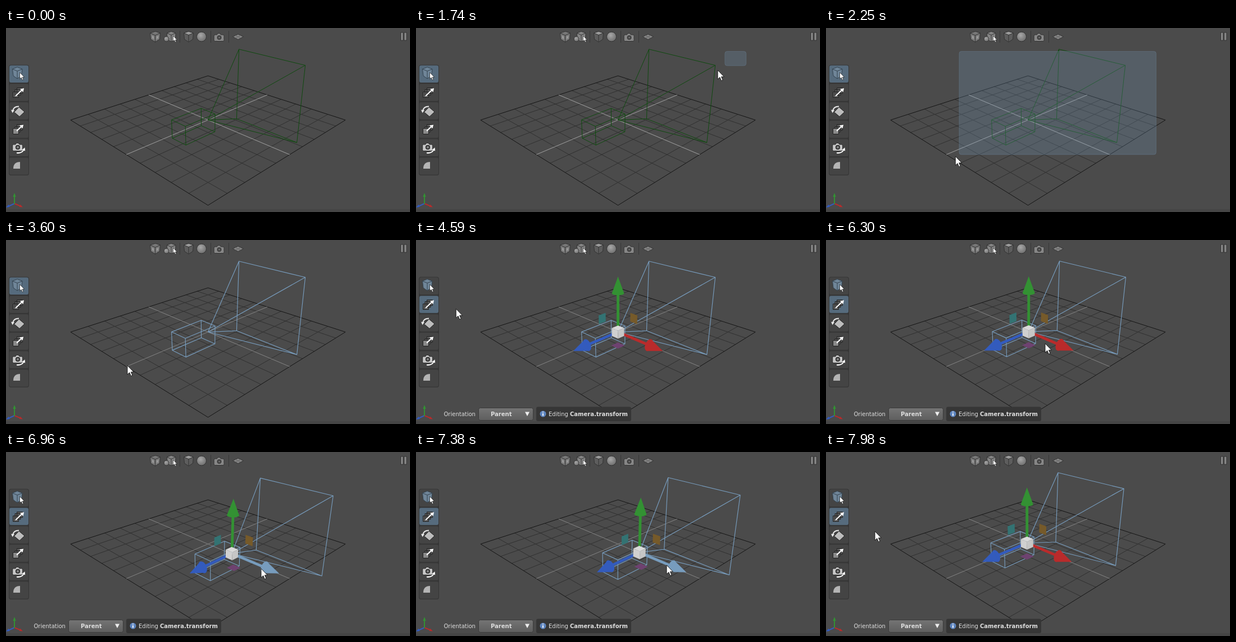
An HTML page for the animation above (8 s loop, 719 by 327 pixels).

```html
<!DOCTYPE html>
<html lang="en">
<head>
<meta charset="utf-8">
<title>Camera gizmo</title>
<style>
html, body { margin: 0; width: 100%; height: 100%; overflow: hidden; background: #4b4b4b; }
svg { display: block; }
text { font: 10px "DejaVu Sans", sans-serif; fill: #dedede; white-space: pre; }
.bold { font-weight: bold; }
</style>
</head>
<body>
<svg id="stage" width="719" height="327" viewBox="0 0 719 327">
  <defs>
    <radialGradient id="ball" cx=".4" cy=".35" r=".7">
      <stop offset="0" stop-color="#a8a8a8"/><stop offset="1" stop-color="#6c6c6c"/>
    </radialGradient>
    <linearGradient id="menu" x2="0" y2="1">
      <stop offset="0" stop-color="#747474"/><stop offset="1" stop-color="#5e5e5e"/>
    </linearGradient>
    <path id="arrow" d="M0 0V16L3.8 12.6L6.4 18.6L9 17.5L6.4 11.7H11.3Z" fill="#fff" stroke="#111" stroke-width=".9"/>
    <path id="snapper" d="M-4.5 -4h2l1.2-2.4h4.2l1.2 2.4h4q2 0 2 2v7.5q0 2-2 2h-14q-2 0-2-2v-7.5q0-2 2-2z"/>
  </defs>
  <rect width="719" height="327" fill="#4b4b4b"/>
  <g id="grid" fill="none"></g>
  <g id="scene" stroke-linejoin="round"></g>
  <rect y="322" width="719" height="5" fill="#454545"/>

  <!-- orientation axes -->
  <g stroke-width="2" stroke-linecap="round">
    <path d="M15 312L3 317.5" stroke="#335bbd"/>
    <path d="M0 318.8L4.6 313.8L6.5 318Z" fill="#335bbd"/>
    <path d="M15 312L26 316.7" stroke="#b92b2b"/>
    <path d="M30 318.5L23.6 318L25.4 313.8Z" fill="#b92b2b"/>
    <path d="M15 312V299" stroke="#339133"/>
    <path d="M15 293L12.3 300H17.7Z" fill="#339133"/>
  </g>

  <!-- top bar -->
  <g stroke="#333" stroke-width="1" stroke-linejoin="round">
    <path d="M309.5 5V26M364.5 5V26M396.5 5V26" stroke="#383838"/>
    <path d="M256.5 9L266 6L274.5 9L273.5 20L265.5 25L257.5 20Z" fill="#777"/>
    <path d="M256.5 9L265.5 13L274.5 9M265.5 13V25" fill="none"/>
    <path d="M260 13.5L263 15V20L260 18.3ZM268 15L271.5 13.5L271 18.3L268 20Z" fill="#999" stroke="none"/>
    <path d="M286.5 9L294 6L302 9L301.5 20L294 24.5L287 20Z" fill="#858585"/>
    <path d="M286.5 9L294 12.5L302 9M294 12.5V24" fill="none"/>
    <circle cx="285.5" cy="19.5" r="4.5" fill="url(#ball)"/>
    <use href="#arrow" transform="translate(297.5 14) scale(.6)"/>
    <path d="M316.5 9L325 6L333.5 9L332.5 20L325 25L317.5 20Z" fill="#5d5d5d"/>
    <path d="M316.5 9L325 6L333.5 9L325 12.5Z" fill="#9b9b9b"/>
    <path d="M325 12.5V25" fill="none"/>
    <circle cx="348" cy="15.5" r="8.5" fill="url(#ball)"/>
    <use href="#snapper" x="378" y="16" fill="#858585"/>
    <circle cx="379.5" cy="17" r="5" fill="#4c4c4c" stroke="#a0a0a0"/>
    <circle cx="379.5" cy="17" r="2" fill="#777"/>
    <path d="M403.5 15.5L413 11L422.5 15.5L413 20.5Z" fill="#858585"/>
    <path d="M408 13.3L418 18M418 13.3L408 18" fill="none" stroke="#666"/>
    <rect x="702.5" y="8" width="4.5" height="14" fill="#858585"/>
    <rect x="708.5" y="8" width="4.5" height="14" fill="#858585"/>
  </g>

  <!-- tool column -->
  <rect x="5" y="65.5" width="36" height="196.5" rx="4" fill="#363636"/>
  <g id="tools"></g>
  <g stroke-linejoin="round">
    <path d="M11.5 73L20 69.5L29 73L27.5 85L20 90L13 85Z" fill="#6f8598" stroke="#35434f"/>
    <path d="M11.5 73L20 76.5L29 73M20 76.5V90" fill="none" stroke="#35434f"/>
    <use href="#arrow" transform="translate(24.5 79) scale(.72)"/>
    <g fill="#5a5a5a" stroke="#222">
      <path d="M19.5 106.5h10v10h-10zM16 109.5h10v10h-10zM12.5 113.5h10v10h-10z"/>
      <path d="M19.5 171.5h10v10h-10zM16 175.5h10v9h-10z"/>
      <path d="M12.5 178.5h10v10h-10z" fill="#8a8a8a"/>
    </g>
    <path d="M17 121L29 109.5M19 183L28 174.5" stroke="#fff" stroke-width="2" fill="none"/>
    <path d="M32 107L30.5 114L25 108.5ZM31 172L29.5 178.5L24 173Z" fill="#fff"/>
    <path d="M23 140.5L33 149L24 157.5L14.5 149.5Z" fill="#bdbdbd" stroke="#222"/>
    <path d="M12 147Q14 139 23 139.5" fill="none" stroke="#e8e8e8" stroke-width="2"/>
    <path d="M9 145.5L15 146L11.5 151Z" fill="#e8e8e8"/>
    <use href="#snapper" x="19.5" y="211" fill="#c4c4c4" stroke="#2a2a2a"/>
    <circle cx="21" cy="212" r="5" fill="#3a3a3a" stroke="#eee"/>
    <circle cx="21" cy="212" r="2" fill="#888"/>
    <path d="M19 222Q29 223 31.5 216" fill="none" stroke="#fff" stroke-width="2"/>
    <path d="M33.5 212.5L34 218.5L28.5 216.5Z" fill="#fff"/>
    <path d="M13 250Q13 238 25 238V250Z" fill="#b4b4b4"/>
  </g>

  <!-- tool settings -->
  <g id="bar">
    <text x="49.5" y="313">Orientation</text>
    <rect x="111.5" y="298.5" width="97" height="22" rx="3" fill="url(#menu)" stroke="#3a3a3a"/>
    <text class="bold" x="133" y="313">Parent</text>
    <path d="M194 305.5H202L198 313Z" fill="#eee"/>
    <rect x="214" y="296.5" width="169" height="25.5" rx="3" fill="#363636"/>
    <circle cx="226" cy="309" r="5.5" fill="#5f86c0"/>
    <path d="M226 308V312.5M226 305V306.6" stroke="#fff" stroke-width="1.8"/>
    <text x="236" y="313">Editing <tspan class="bold">Camera.transform</tspan></text>
  </g>

  <rect id="marquee" rx="4" fill="#779cbd" fill-opacity=".24" stroke="#779cbd" stroke-opacity=".25"/>
  <use id="cursor" href="#arrow"/>
</svg>
<script>
const LOOP = 8000, STEP = 30;
const BLUE = '#779cbd', AXES = ['#b92b2b', '#339133', '#335bbd'];
const el = id => document.getElementById(id);

// --- view: orbit camera looking at the world origin ---
const DIST = 20.18, FOCAL = 698, SIN = 0.423, COS = 0.906;
const depth = ([x, y, z]) => DIST - (x + z) * Math.SQRT1_2 * COS - y * SIN;
function project(p) {
  const k = FOCAL / depth(p);
  const side = (p[0] - p[2]) * Math.SQRT1_2, near = (p[0] + p[2]) * Math.SQRT1_2;
  return [359.5 + side * k, 163.5 + (near * SIN - p[1] * COS) * k];
}
const add = (a, b) => a.map((v, i) => v + b[i]);
const trace = pts => 'M' + pts.map(p => p.map(v => v.toFixed(2)).join(' ')).join('L');
const path3 = pts => trace(pts.map(project));
const shape = (d, fill) => `<path d="${d}Z" fill="${fill}"/>`;
const line = (d, stroke, width = 1) => `<path d="${d}" fill="none" stroke="${stroke}" stroke-width="${width}"/>`;

// --- timing: key = [time, easing into it, ...values] ---
const EASE = {
  lin: u => u,
  in: u => u * u,
  out: u => u * (2 - u),
  both: u => (1 - Math.cos(Math.PI * u)) / 2
};
function sample(keys, t) {
  const i = keys.findIndex(k => k[0] > t);
  if (i === 0) return keys[0].slice(2);
  if (i < 0) return keys[keys.length - 1].slice(2);
  const a = keys[i - 1], b = keys[i];
  const u = EASE[b[1]]((t - a[0]) / (b[0] - a[0]));
  return b.slice(2).map((v, j) => a[j + 2] + (v - a[j + 2]) * u);
}

const MOVE_Z = [
  [5200, 'lin', 0], [5545, 'both', 2.6], [5600, 'lin', 2.6],
  [6000, 'in', 0.45], [6060, 'out', -0.05]
];
const MOVE_X = [
  [6730, 'lin', 0], [7110, 'both', 2.42], [7170, 'lin', 2.42],
  [7380, 'in', 1.44], [7530, 'lin', 0.4], [7620, 'out', -0.12]
];
const CURSOR = [
  [870, 'lin', 580, 328], [1110, 'in', 575, 200], [1320, 'lin', 591, 62], [1410, 'out', 588, 41],
  [1620, 'lin', 588, 41], [1740, 'lin', 537, 75], [2100, 'lin', 290, 195], [2310, 'out', 225, 231],
  [3570, 'lin', 225, 231], [3600, 'lin', 216, 223], [3850, 'lin', 70, 137], [3990, 'out', 21, 109],
  [4440, 'lin', 21, 109], [4980, 'both', 302, 184],
  [5190, 'lin', 302, 184], [5370, 'in', 248, 214], [5530, 'out', 222, 225], [5600, 'lin', 222, 225],
  [6000, 'in', 288, 193], [6060, 'out', 302, 184],
  [6180, 'lin', 302, 184], [6300, 'lin', 390, 184],
  [6420, 'lin', 390, 184], [6510, 'out', 409, 184],
  [6730, 'lin', 409, 184], [7110, 'both', 477, 219], [7170, 'lin', 477, 219],
  [7380, 'in', 446, 201], [7530, 'lin', 418, 189], [7620, 'out', 404, 183],
  [7650, 'lin', 404, 183], [7980, 'both', 87, 141]
];

function drawGrid(bright) {
  const pair = i => path3([[i, 0, -5], [i, 0, 5]]) + path3([[-5, 0, i], [5, 0, i]]);
  let thin = '';
  for (let i = 1; i < 5; i++) thin += pair(i) + pair(-i);
  el('grid').innerHTML = line(thin, '#303030') + line(pair(5) + pair(-5), '#141414') +
    line(pair(0), bright ? '#a0a0a0' : '#848484');
}

function cameraWire(pos) {
  const ring = (half, z) => [[-1, 1], [1, 1], [1, -1], [-1, -1]]
    .map(([x, y]) => add(pos, [x * half, y * half, z]));
  const back = ring(0.5, 2), front = ring(0.5, 0), far = ring(5 * Math.tan(Math.PI * 25 / 180), -5);
  let d = [back, front, far].map(r => path3(r) + 'Z').join('');
  for (let i = 0; i < 4; i++) d += path3([back[i], front[i]]) + path3([pos, far[i]]);
  return d;
}

function gizmo(pos, active) {
  const s = depth(pos) / DIST;
  const place = v => project(add(pos, v.map(c => c * s)));
  const on = (axis, a, b = 0, c = 0) => {
    const v = [0, 0, 0];
    v[axis] = a; v[(axis + 1) % 3] = b; v[(axis + 2) % 3] = c;
    return place(v);
  };
  let out = '';

  // plane handles, each named by the axis it is perpendicular to
  ['#337373', '#6e4270', '#765a2a'].forEach((fill, n) => {
    const lo = 0.85, hi = 1.31;
    out += shape(trace([[lo, lo], [hi, lo], [hi, hi], [lo, hi]].map(q => on(n, 0, ...q))), fill);
  });

  for (const n of [1, 2, 0]) {
    const fill = n === active ? BLUE : AXES[n];
    const tip = on(n, 2.95), base = on(n, 2.1);
    const rim = Array.from({length: 24}, (_, i) => {
      const a = i * Math.PI / 12;
      return on(n, 2.1, 0.3 * Math.cos(a), 0.3 * Math.sin(a));
    });
    const off = p => (p[0] - base[0]) * (tip[1] - base[1]) - (p[1] - base[1]) * (tip[0] - base[0]);
    const sorted = [...rim].sort((a, b) => off(a) - off(b));
    out += line(trace([on(n, 0.2), base]), fill, 4.8) + shape(trace(rim), fill) +
      shape(trace([tip, sorted[0], sorted[23]]), fill);
  }

  const h = 0.225;
  const face = (pts, fill) => shape(trace(pts.map(p => place(p.map(c => c * h)))), fill);
  return out +
    face([[-1, 1, -1], [1, 1, -1], [1, 1, 1], [-1, 1, 1]], '#dadada') +
    face([[-1, 1, 1], [1, 1, 1], [1, -1, 1], [-1, -1, 1]], '#d0d0d0') +
    face([[1, 1, 1], [1, 1, -1], [1, -1, -1], [1, -1, 1]], '#c6c6c6');
}

function drawTools(active, hover) {
  let out = '';
  for (let i = 0; i < 6; i++) {
    const fill = i === active ? '#566b7d' : i === hover ? '#505050' : '#444';
    out += `<rect x="6" y="${66.5 + i * 32.75}" width="34" height="30.5" rx="3" fill="${fill}"/>`;
  }
  el('tools').innerHTML = out;
}

function render(t) {
  const selected = t >= 2640, moving = t >= 4410;
  const pos = [sample(MOVE_X, t)[0], 0, sample(MOVE_Z, t)[0]];
  const active = t >= 4920 && t < 6240 ? 2 : t >= 6480 && t < 7680 ? 0 : -1;

  drawGrid(!selected);
  el('scene').innerHTML = line(cameraWire(pos), selected ? BLUE : '#0f4a0f', selected ? 1.15 : 1) +
    (moving ? gizmo(pos, active) : '');
  drawTools(moving ? 1 : 0, t >= 3930 ? 1 : -1);
  el('bar').style.display = moving ? '' : 'none';

  const [cx, cy] = sample(CURSOR, t);
  el('cursor').style.display = t >= 900 ? '' : 'none';
  el('cursor').setAttribute('transform', `translate(${cx} ${cy})`);

  // the selection box trails the pointer by one step
  const dragging = t > 1620 && t < 2640;
  const [mx, my] = sample(CURSOR, t - STEP);
  const box = {x: mx, y: 41.5, width: Math.max(0, 587.5 - mx), height: Math.max(0, my - 41)};
  el('marquee').style.display = dragging ? '' : 'none';
  for (const k in box) el('marquee').setAttribute(k, box[k]);
}

const start = performance.now();
let last = -1;
function tick() {
  const t = Math.floor(((performance.now() - start) % LOOP) / STEP) * STEP;
  if (t !== last) render(last = t);
  requestAnimationFrame(tick);
}
tick();
</script>
</body>
</html>
```
